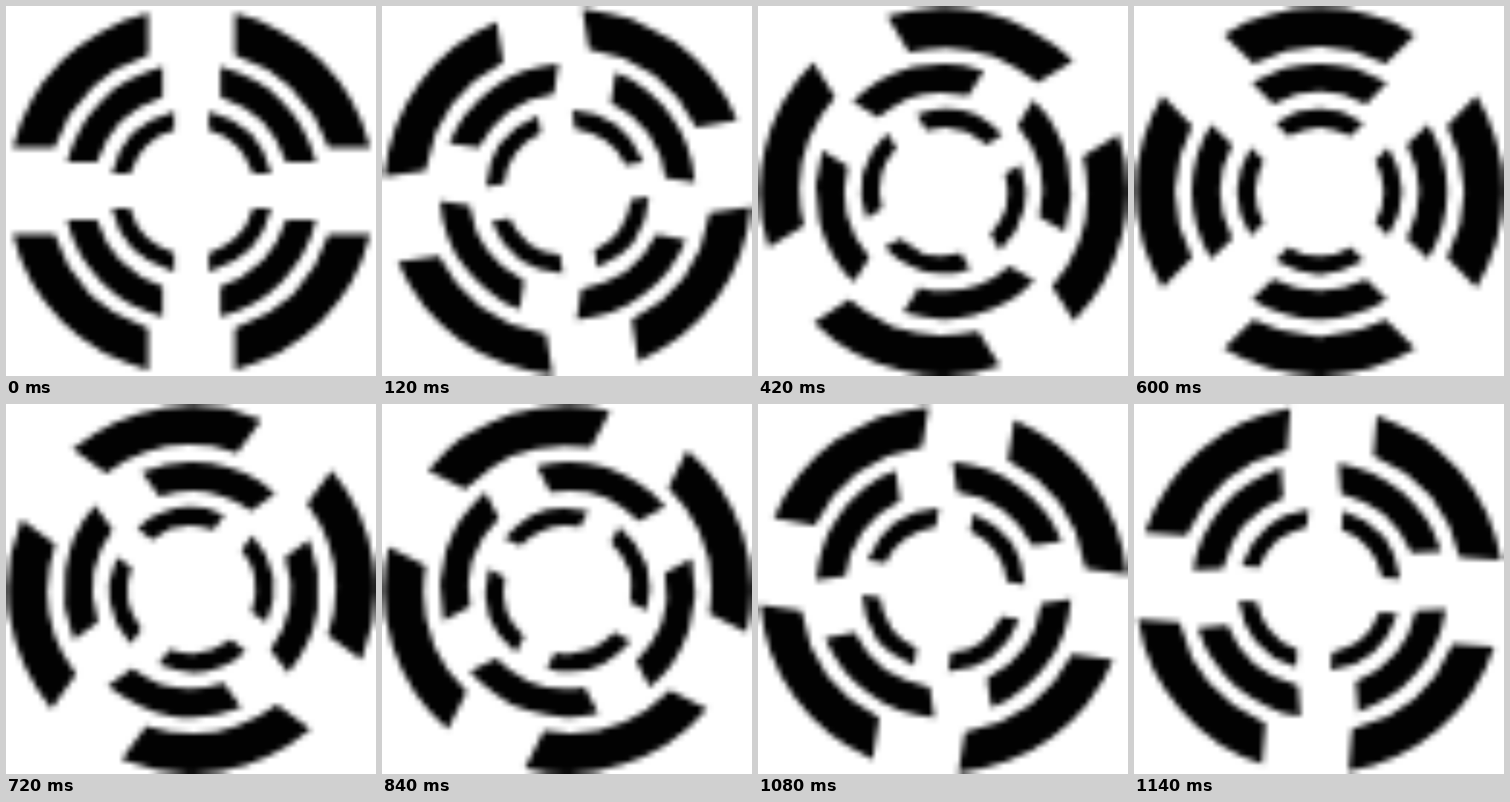
Recreate the animation shown at these times as an HTML page with a canvas. Size 512x512 px, loop 1.2 s.

```html
<!DOCTYPE html>
<html lang="en">
<head>
<meta charset="utf-8">
<title>Counter-rotating rings</title>
<style>
  html, body { margin: 0; height: 100%; overflow: hidden; background: #fff; }
  canvas { display: block; width: 100%; height: 100%; }
</style>
</head>
<body>
<canvas width="64" height="64"></canvas>
<script>
const LOOP = 1200, STEP = 60, SIZE = 64, CENTER = 32.1;
const ctx = document.querySelector('canvas').getContext('2d');

// Drawn small and enlarged by CSS, which gives the soft edges.
const rings = [
  { outer: 31.8, inner: 24.85, gap: 7.5, dir: -1 },
  { outer: 22.1, inner: 17.1, gap: 5, dir: 1 },
  { outer: 14.1, inner: 11.05, gap: 3, dir: -1 },
];

function segment({ outer, inner, gap }) {
  const a = Math.asin(gap / outer), b = Math.asin(gap / inner);
  ctx.beginPath();
  ctx.arc(0, 0, outer, a, Math.PI / 2 - a);
  ctx.arc(0, 0, inner, Math.PI / 2 - b, b, true);
  ctx.fill();
}

function draw(time) {
  const t = Math.floor(time % LOOP / STEP) * STEP;
  const turn = t / LOOP * Math.PI / 2;
  ctx.resetTransform();
  ctx.fillStyle = '#fff';
  ctx.fillRect(0, 0, SIZE, SIZE);
  ctx.fillStyle = '#020202';
  for (const ring of rings) {
    ctx.setTransform(1, 0, 0, 1, CENTER, CENTER);
    ctx.rotate(ring.dir * turn);
    for (let i = 0; i < 4; i++) {
      segment(ring);
      ctx.rotate(Math.PI / 2);
    }
  }
}

const start = performance.now();
function tick() {
  draw(performance.now() - start);
  requestAnimationFrame(tick);
}
tick();
</script>
</body>
</html>
```
